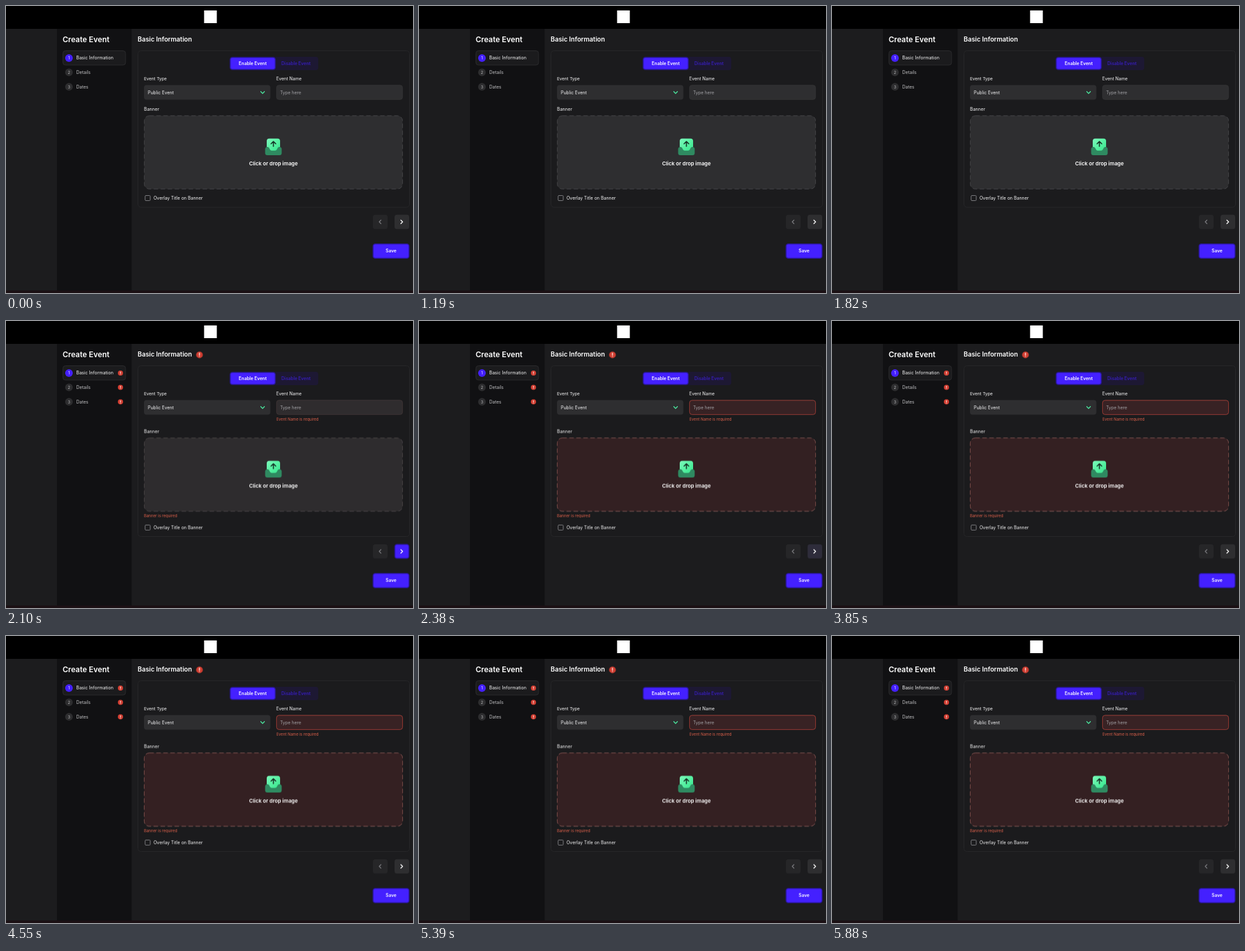
Recreate the animation shown at these times as an HTML page. Size 640 by 452 pixels, loop 5.95 s.

```html
<!DOCTYPE html>
<html lang="en">
<head>
<meta charset="utf-8">
<title>Create Event</title>
<style>
  html, body { margin: 0; width: 100%; height: 100%; overflow: hidden; background: #1c1c1e; }
  svg { display: block; width: 100vw; height: 100vh; }
  text { font: 400 7px Inter, "Open Sans", sans-serif; fill: #f7f7f8; }
  .semi { font-weight: 600; fill: #fff; }
  .mid { text-anchor: middle; }
  .dim { fill: #c0c0c3; }
  .hint { fill: #a2a2a6; }
  .error { font-size: 6.05px; fill: #d95f4a; }
  .num { font-size: 6px; }
  .field { fill: #2e2e30; }
  .blue { fill: #4420ff; stroke: #2a1899; stroke-width: 1.6; }
  .line { fill: none; stroke-linecap: round; stroke-linejoin: round; }

  /* Validation fires at 2100 ms of the 5950 ms loop */
  .shown, .red, .pressed, .down1, .down2, .card { animation: 5950ms linear infinite; }
  .shown { animation-name: show; }
  .red { animation-name: redden; }
  .pressed { animation-name: press; }
  .down1 { --d: 11.5px; animation-name: drop; }
  .down2 { --d: 22.8px; animation-name: drop; }
  .card { animation-name: grow; }
  @keyframes show { 0%, 35.28% { opacity: 0; } 35.29%, 100% { opacity: 1; } }
  @keyframes redden { 0%, 35.28% { opacity: 0; } 35.29% { opacity: .1; } 40.3%, 100% { opacity: 1; } }
  @keyframes press { 0%, 35.28% { opacity: 0; } 35.29% { opacity: 1; } 40.3%, 100% { opacity: 0; } }
  @keyframes drop { 0%, 35.28% { transform: none; } 35.29%, 100% { transform: translateY(var(--d)); } }
  @keyframes grow { 0%, 35.28% { height: 246.5px; } 35.29%, 100% { height: 269px; } }
</style>
</head>
<body>
<svg viewBox="0 0 640 452" preserveAspectRatio="none">
  <defs>
    <linearGradient id="mint" x1="0" y1="0" x2="1" y2="1">
      <stop offset="0" stop-color="#7dfbbb"/>
      <stop offset="1" stop-color="#35e68c"/>
    </linearGradient>
    <g id="alert">
      <circle r="4.1" fill="#cf3d31"/>
      <path class="line" d="M0-2V.5M0 2v.1" stroke="#ffd9d2" stroke-width="1.2"/>
    </g>
  </defs>

  <rect width="640" height="452" fill="#1c1c1e"/>
  <rect x="80" y="36" width="117.5" height="412" fill="#111113"/>
  <rect width="640" height="36" fill="#000"/>
  <rect x="311.5" y="7" width="20" height="20" fill="#fff"/>
  <rect y="448" width="640" height="4" fill="#1b1014"/>

  <!-- Sidebar -->
  <text class="semi" x="89" y="57" style="font-size:11.9px">Create Event</text>
  <rect x="89.5" y="70.5" width="98.5" height="22.5" rx="4" fill="#1b1b1d" stroke="#2b2b2d"/>
  <circle cx="99" cy="82" r="6" fill="#4420ff"/>
  <circle cx="99" cy="104.5" r="6" fill="#2d2d2f"/>
  <circle cx="99" cy="127.3" r="6" fill="#2d2d2f"/>
  <text class="mid num" x="99" y="84.1">1</text>
  <text class="mid num dim" x="99" y="106.7">2</text>
  <text class="mid num dim" x="99" y="129.5">3</text>
  <text x="110.5" y="84.4" style="font-size:7.1px">Basic Information</text>
  <text class="dim" x="110.5" y="107">Details</text>
  <text class="dim" x="110.5" y="129.8">Dates</text>

  <!-- Form -->
  <text class="semi" x="207" y="56.4" style="font-size:10.1px">Basic Information</text>
  <rect class="card" x="207.5" y="70.5" width="427" height="246.5" rx="5" fill="#1b1b1d" stroke="#272729"/>
  <rect x="351.5" y="80" width="139.5" height="21" rx="4" fill="#1d1833"/>
  <rect class="blue" x="352.6" y="81" width="70.8" height="19" rx="3.5"/>
  <text class="semi mid" x="388" y="92.6">Enable Event</text>
  <text class="semi mid" x="456" y="92.6" style="fill:#361db8">Disable Event</text>

  <text x="217" y="117.4" style="font-size:6.8px">Event Type</text>
  <text x="425" y="117.4">Event Name</text>
  <rect class="field" x="217" y="124.5" width="198.7" height="23" rx="4"/>
  <text x="223" y="138.8">Public Event</text>
  <path class="line" d="M400.6 134.8l2.9 2.9 2.9-2.9" stroke="#4beaa0" stroke-width="1.3"/>
  <rect class="field" x="425.4" y="124.7" width="198.2" height="22.6" rx="4" stroke="#363638" stroke-width=".8"/>
  <rect class="red" x="425.4" y="125" width="198.2" height="22.3" rx="4" fill="#382224" stroke="#a43a33" stroke-width=".9"/>
  <text class="hint" x="431" y="138.8">Type here</text>

  <g class="down1">
    <text x="217" y="164.6" style="font-size:7.1px">Banner</text>
    <rect class="field" x="217.4" y="172.8" width="406.2" height="115.4" rx="8" stroke="#48484b" stroke-width=".9" stroke-dasharray="7 4"/>
    <rect class="red" x="217.4" y="172.8" width="406.2" height="115.2" rx="8" fill="#342022" stroke="#85504b" stroke-width=".9" stroke-dasharray="7 4"/>
    <rect x="407.5" y="222" width="26" height="13" rx="3.5" fill="#2f8a61"/>
    <path d="M414 208.8h13q4 0 4 4v9.2h-1.5q-1.6 0-2.3 1.5l-1 2q-1 2.2-3.2 2.2h-5q-2.2 0-3.2-2.2l-1-2q-.7-1.5-2.3-1.5H410v-9.2q0-4 4-4z" fill="url(#mint)"/>
    <path class="line" d="M420.5 221v-7.5M416.8 217l3.7-3.7 3.7 3.7" stroke="#17372a" stroke-width="1.7"/>
    <text class="semi mid" x="420.5" y="250.8" style="font-size:8.2px">Click or drop image</text>
  </g>

  <g class="down2">
    <rect x="218.8" y="298.5" width="8" height="8" rx="1.2" fill="none" stroke="#8b8b8e" stroke-width=".9"/>
    <text x="232" y="305.1">Overlay Title on Banner</text>
    <rect x="577" y="328.7" width="23" height="22.6" rx="3.5" fill="#262628"/>
    <path class="line" d="M589.7 337.2l-2.8 2.8 2.8 2.8" stroke="#858589" stroke-width="1.2"/>
    <rect x="611" y="328.7" width="23" height="22.6" rx="3.5" fill="#2e2e30"/>
    <rect class="pressed blue" x="611.4" y="329" width="22.2" height="22" rx="3.5"/>
    <path class="line" d="M620.9 337.2l2.8 2.8-2.8 2.8" stroke="#fff" stroke-width="1.4"/>
    <rect class="blue" x="577.2" y="374.8" width="56.6" height="22.4" rx="3.5"/>
    <text class="semi mid" x="605.5" y="388.2" style="font-size:7.1px">Save</text>
  </g>

  <!-- Validation messages -->
  <g class="shown">
    <use href="#alert" x="180" y="82"/>
    <use href="#alert" x="180" y="104.5"/>
    <use href="#alert" x="180" y="127.3"/>
    <use href="#alert" transform="translate(304.2 53.2) scale(1.28)"/>
    <text class="error" x="425.2" y="157.2">Event Name is required</text>
    <text class="error" x="217" y="309">Banner is required</text>
  </g>
</svg>
</body>
</html>
```
